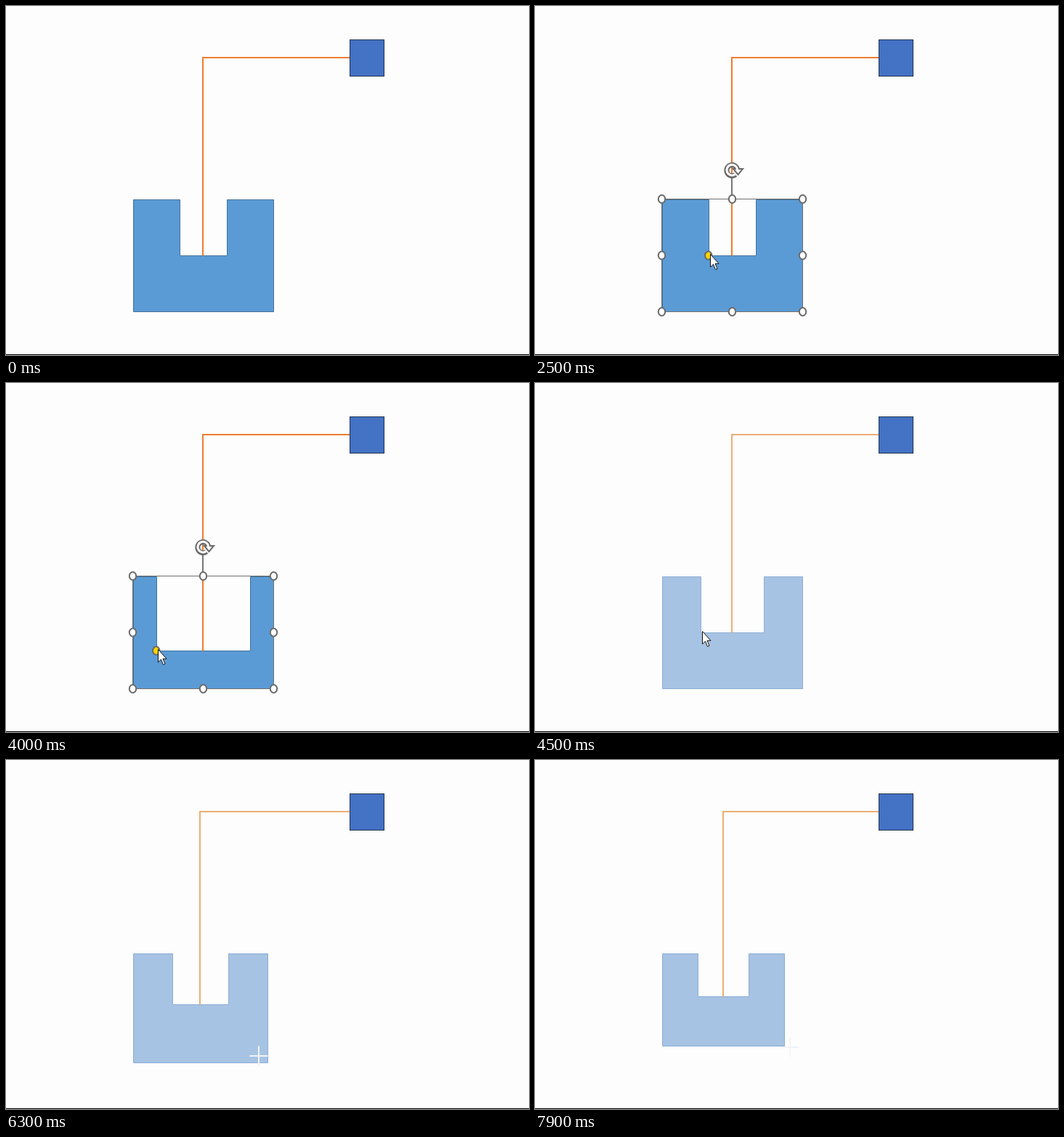
An HTML page that plays this animation: 720x480 px, repeating every 8000 ms.

```html
<!DOCTYPE html>
<html lang="en">
<head>
<meta charset="utf-8">
<title>Shape editing</title>
<style>
  html, body { margin: 0; width: 100%; height: 100%; overflow: hidden; background: #fdfdfd; }
  svg { display: block; width: 720px; height: 480px; }
  .handle { fill: #fff; stroke: #6a6a6a; stroke-width: 2; }
  .adjust { fill: #fbd400; }
  .outlined { fill: #fff; stroke: #111; }
  #block { fill: #5b9bd5; stroke: #41719c; }
  #wire { fill: none; stroke: #ed7d31; stroke-width: 2; }
  .dragging #block { fill: #a7c3e3; stroke: #8badd6; }
  .dragging #wire { stroke: #ecae74; }
  .dragging #selection { visibility: hidden; }
</style>
</head>
<body>
<svg id="stage" viewBox="0 0 720 480">
  <rect y="479" width="720" height="1"/>
  <path id="block"/>
  <path id="wire"/>
  <rect x="473.5" y="46.5" width="47" height="50" fill="#4472c4" stroke="#1f3354"/>
  <g id="selection">
    <rect id="frame" fill="none" stroke="#6f6f6f"/>
    <g id="rotate" fill="none">
      <path d="M0 11V34" stroke="#777" stroke-width="2"/>
      <path d="M5 6A7.5 7.5 0 1 1 7.5 -2" stroke="#6a6a6a" stroke-width="7"/>
      <path d="M2 -2H15L8.5 6Z" fill="#fff" stroke="#6a6a6a" stroke-width="2"/>
      <path d="M4.5 5.5A7.3 7.3 0 1 1 7.5 -1" stroke="#fff" stroke-width="3"/>
    </g>
  </g>
  <path id="arrow" class="outlined" d="M.5 .5V18L4.5 14.2L7.5 21.5L10 20.4L7 13.3H12Z"/>
  <path id="resize" class="outlined" d="M-8.5 -9.5H-2L-4 -7L4.5 3L7 1V9.5H.5L2.5 7L-6 -3L-8.5 -1Z"/>
  <path id="cross" d="M0 -13.5V13.5M-12.5 0H12.5" stroke="#f1f4f5" stroke-width="2"/>
</svg>
<script>
const LOOP = 8000, STEP = 100;
const LEFT = 175.5, TOP = 266.5;

// Moments of the story, in steps.
const ENTER = 3, SELECT = 14, ADJUST = 28, READJUST = 42, LEAVE = 48;
const RETURN = 56, SHRINK = 61, GROW = 75;

const el = id => document.getElementById(id);
const show = (node, on) => node.style.visibility = on ? 'visible' : 'hidden';
const move = (node, x, y) => node.setAttribute('transform', `translate(${x} ${y})`);
const set = (node, attrs) => Object.entries(attrs).forEach(([k, v]) => node.setAttribute(k, v));
const pixel = v => Math.round(v - .5) + .5;
const shift = ([x, y], dx, dy) => [x + dx, y + dy];

// Eases from a to b; bow bends the path downwards halfway.
function glide(a, b, step, start, length, bow = 0) {
  const t = Math.min(1, Math.max(0, (step - start) / length));
  const k = t * t * (3 - 2 * t);
  return [a[0] + (b[0] - a[0]) * k, a[1] + (b[1] - a[1]) * k + bow * 4 * k * (1 - k)];
}

// Inset and depth of the notch as fractions of the block.
function notchAt(step) {
  const wide = glide([.334, .5], [.166, .662], step, ADJUST, 9);
  return glide(wide, [.293, .468], step, READJUST, 4);
}

function cornerAt(step) {
  const small = glide([368.5, 420.5], [313.5, 378], step, SHRINK, 8.4, 4);
  return glide(small, [354, 399], step, GROW, 6);
}

function pointerAt(step, grip, dragging) {
  if (step < ADJUST) {
    const inside = glide([294, 478], [217, 390], step, ENTER, 8);
    return glide(inside, grip, step, SELECT, 8);
  }
  if (step < SHRINK) {
    const outside = glide(grip, [375, 431], step, LEAVE, 7);
    return glide(outside, cornerAt(step), step, RETURN, 2);
  }
  // The block trails the hand slightly while it is resized.
  return dragging ? shift(cornerAt(step + 1.3), -1.5, -3) : cornerAt(step);
}

const handles = Array.from({ length: 9 }, (_, i) => {
  const dot = document.createElementNS('http://www.w3.org/2000/svg', 'ellipse');
  set(dot, { rx: 4.7, ry: 5.6, class: i < 8 ? 'handle' : 'handle adjust' });
  el('selection').append(dot);
  return dot;
});

function drawSelection(right, bottom, notchX, notchY) {
  const x = LEFT - 1, y = TOP - 1;
  const xs = [x, (x + right) / 2, right];
  const ys = [y, (y + bottom) / 2, bottom];
  const spots = ys.flatMap(v => xs.map(u => [u, v]));
  spots.splice(4, 1);
  spots.push([notchX - .8, notchY - .3]);
  spots.forEach((spot, i) => move(handles[i], ...spot));
  set(el('frame'), { x, y, width: right - x, height: bottom - y });
  move(el('rotate'), Math.round(xs[1] - .5), 226);
}

function draw(step) {
  const dragging = [[ADJUST, 10], [READJUST, 5], [SHRINK, 9], [GROW, 9]]
    .some(([start, length]) => step >= start && step < start + length);
  const [right, bottom] = cornerAt(step).map(pixel);
  const [inset, depth] = notchAt(step);
  const width = right - LEFT;
  const notchLeft = pixel(LEFT + width * inset);
  const notchRight = pixel(right - width * inset);
  const floor = pixel(TOP + (bottom - TOP) * depth);
  const middle = Math.round((LEFT + right) / 2 - .9);

  el('stage').classList.toggle('dragging', dragging);
  set(el('block'), {
    d: `M${LEFT} ${TOP}H${notchLeft}V${floor}H${notchRight}V${TOP}H${right}V${bottom}H${LEFT}Z`
  });
  set(el('wire'), { d: `M473 71H${middle}V${floor}` });

  show(el('selection'), step >= SELECT && !dragging);
  drawSelection(right, bottom, notchLeft, floor);

  const cursor = step < RETURN + 2 ? 'arrow' : dragging ? 'cross' : 'resize';
  const [x, y] = pointerAt(step, [notchLeft + 1.5, floor - 3], dragging);
  for (const id of ['arrow', 'cross', 'resize']) {
    show(el(id), id === cursor && step >= ENTER);
    move(el(id), Math.round(x), Math.round(y));
  }
}

const start = performance.now();
function tick() {
  draw(Math.floor((performance.now() - start) % LOOP / STEP));
  requestAnimationFrame(tick);
}
tick();
</script>
</body>
</html>
```
